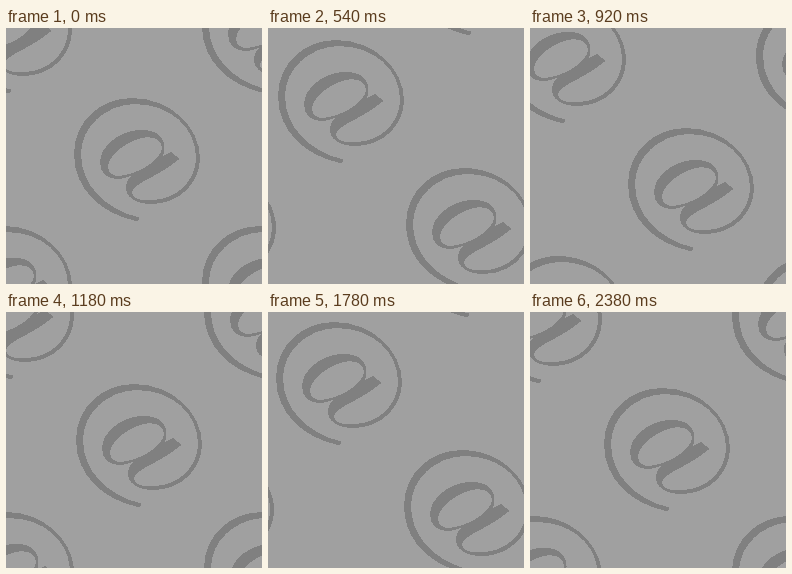
These frames come from a looping animation (256 px wide and 256 px high, 2400 ms). An HTML page:

```html
<!DOCTYPE html>
<html lang="en">
<head>
<meta charset="utf-8">
<title>Drifting at signs</title>
<style>
  html, body { margin: 0; width: 100%; height: 100%; overflow: hidden; background: #a0a0a0; }
  svg { display: block; width: 256px; height: 256px; }
</style>
</head>
<body>
<svg viewBox="0 0 256 256" shape-rendering="crispEdges">
  <defs>
    <g id="at" fill="#808080">
      <!-- ring, hook and stem -->
      <path d="M132 193.5C95 186 68 161 68 126C68 93 95 70 126 70C165 70 194 100 194 130
        C194 156 172 176 146 176C128 176 120 168 120 160C120 153 123 150 128 146
        C138 141 150 135 157 128L165.5 124L173.5 131C160 142 146 149 138 153
        C130 158 126 161 126 165C126 171 136 173 146 172C170 172 190 153 190 130
        C190 100 165 76 128 76C99 77 75 99 75 126C75 156 98 181 133 189.5Z"/>
      <!-- bowl -->
      <path fill-rule="evenodd" d="M157 128C161 118 158 102 137 102C115 101 94 118 94 134
        C94 146 102 151 111 151C122 151 145 141 157 128Z
        M156 120C155 110 146 108 136 110C119 114 102 128 102 139
        C102 147 110 149 116 147.5C134 145 155 132 156 120Z"/>
    </g>
  </defs>
  <g id="pattern"></g>
</svg>
<script>
  const STEP = 20, STEPS = 120, CELL = 128;
  const pattern = document.getElementById('pattern');

  // Checkerboard of signs, one cell beyond the stage
  for (let row = -1; row <= 2; row++) {
    for (let col = -1; col <= 2; col++) {
      if ((row + col) % 2) continue;
      const sign = document.createElementNS('http://www.w3.org/2000/svg', 'use');
      sign.setAttribute('href', '#at');
      sign.setAttribute('x', col * CELL);
      sign.setAttribute('y', row * CELL);
      pattern.append(sign);
    }
  }

  function draw(now) {
    const step = Math.floor(now / STEP) % STEPS;
    // Diagonal drift that slows down slightly over the loop
    const shift = Math.round(2.155 * step - 0.00045 * step * step) % CELL;
    pattern.setAttribute('transform', `translate(${-shift} ${-shift})`);
  }

  const start = performance.now();
  function tick() {
    draw(performance.now() - start);
    requestAnimationFrame(tick);
  }
  tick();
</script>
</body>
</html>
```
